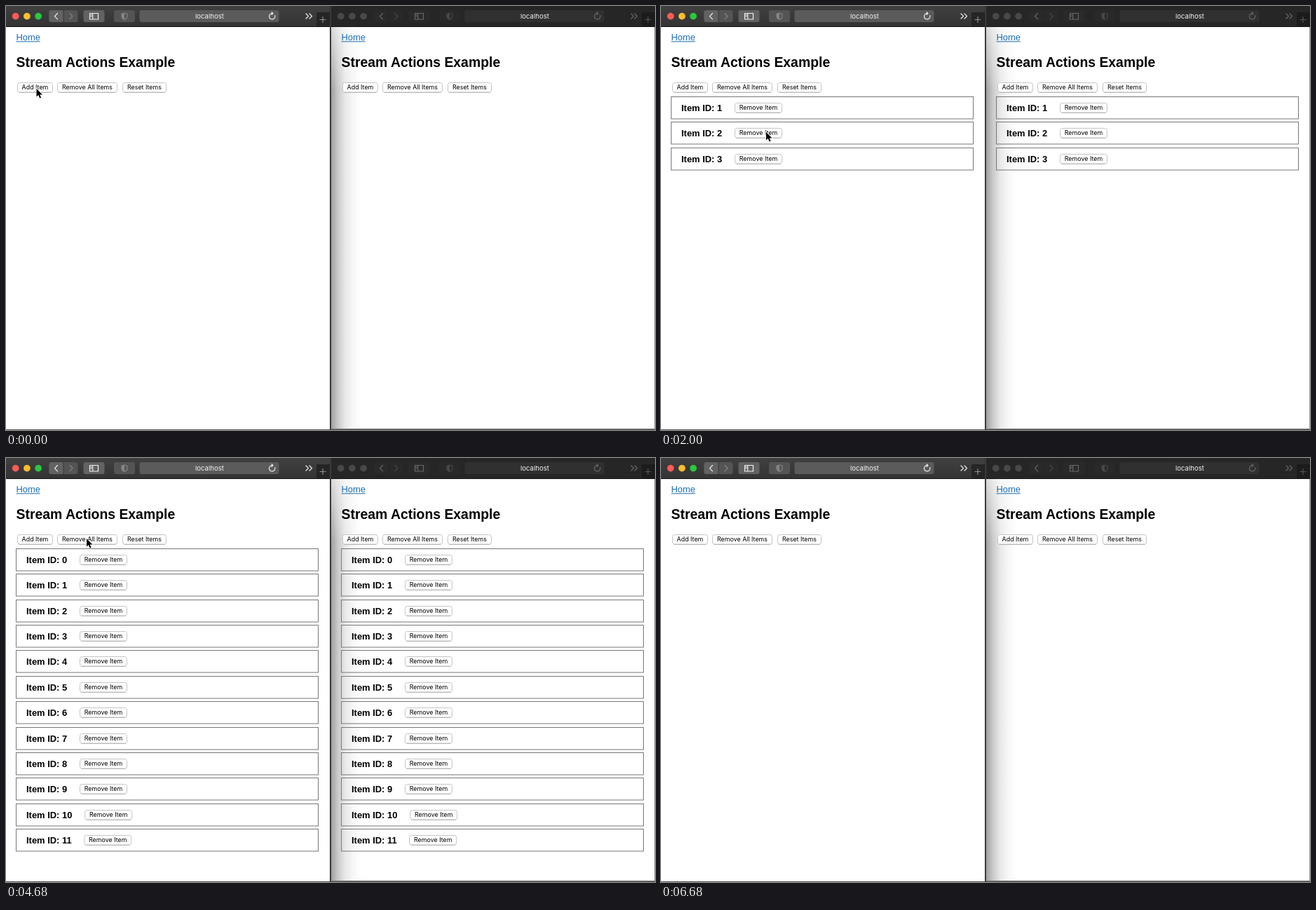
Animation, 926 px wide and 605 px high, one loop 6.74 s. Source, as an HTML page:

```html
<!DOCTYPE html>
<html lang="en">
<head>
<meta charset="utf-8">
<title>Stream Actions</title>
<style>
  html, body { margin: 0; width: 100%; height: 100%; overflow: hidden; background: #fff; }
  svg { display: block; }
  text { font-family: "Liberation Sans", Arial, Helvetica, sans-serif; }
  .link { font-size: 12.93px; fill: #1a6db3; }
  .title { font-size: 19.4px; font-weight: 700; }
  .label { font-size: 12.93px; font-weight: 700; }
  .ui { font-family: Inter, Roboto, sans-serif; font-size: 8.9px; text-anchor: middle; }
  .address { font-size: 9.6px; fill: #f4f4f4; }
  .icon { fill: none; stroke-width: 1.2; stroke-linecap: round; stroke-linejoin: round; }
</style>
</head>
<body>
<svg id="stage" width="926" height="605" viewBox="0 0 926 605">
  <defs>
    <linearGradient id="bar" x2="0" y2="1">
      <stop stop-color="#404040"/><stop offset="1" stop-color="#333"/>
    </linearGradient>
    <linearGradient id="shade">
      <stop stop-opacity=".38"/><stop offset=".2" stop-opacity=".22"/>
      <stop offset=".45" stop-opacity=".09"/><stop offset=".72" stop-opacity=".03"/>
      <stop offset="1" stop-opacity="0"/>
    </linearGradient>
    <linearGradient id="fade" x2="0" y2="1">
      <stop stop-color="#fff" stop-opacity=".6"/><stop offset="1" stop-color="#fff" stop-opacity="0"/>
    </linearGradient>
  </defs>
</svg>
<script>
const LOOP = 6740, ROW = 36.36;

// [time, ids in the list]
const lists = [
  [0, []], [450, [1]], [850, [1, 2]], [1300, [1, 2, 3]], [2250, [1, 3]],
  [3550, [...Array(12).keys()]], [4800, []]
];

// [time, x, y] of the pointer tip
const path = [
  [0, 43.5, 118], [500, 43.5, 118], [1000, 48.5, 118], [1400, 48.5, 118],
  [1900, 150, 180], [2300, 150, 180], [3000, 212, 123], [3150, 212, 123],
  [3500, 206, 116.5], [4000, 206, 116.5], [4500, 115, 115], [5800, 115, 115],
  [6350, 230, -20], [LOOP, 230, -20]
];

const rect = (x, y, w, h, fill, more = '') =>
  `<rect x="${x}" y="${y}" width="${w}" height="${h}" fill="${fill}" ${more}/>`;
const text = (x, y, cls, s) => `<text x="${x}" y="${y}" class="${cls}">${s}</text>`;
const icon = (d, color) => `<path class="icon" d="${d}" stroke="${color}"/>`;

const button = (x, y, w, s) =>
  rect(x + .5, y + .5, w - 1, 13.5, '#fff', 'rx="3" stroke="#c4c4c4"') +
  rect(x + 2.5, y + 14, w - 5, .7, '#a8a8a8') +
  text(x + w / 2, y + 9.9, 'ui', s);

function toolbar(active) {
  const [key, dimKey, field, ink, dim, edge] = active
    ? ['#626262', '#545454', '#5b5b5b', '#f0f0f0', '#858585', '#252525']
    : ['#2a2a2a', '#292929', '#303030', '#686868', '#484848', '#1c1c1c'];
  const lights = active ? ['#fc5b57', '#fdbd2e', '#2ac840'] : Array(3).fill('#484848');
  const box = (x, w, fill) => rect(x, 6, w, 17, fill, 'rx="3"');
  return rect(0, 0, 463, 30, active ? 'url(#bar)' : '#262626') +
    lights.map((c, i) => `<circle cx="${13.7 + 16.2 * i}" cy="14.6" r="4.9" fill="${c}"/>`).join('') +
    box(61.5, 41, dimKey) + box(61.5, 20, key) + rect(81.7, 6, 1, 17, active ? '#3b3b3b' : '#262626') +
    box(110.5, 30, key) + box(154, 30, dimKey) + box(190.5, 199, field) +
    icon('M73.5 10.5l-4 4.2 4 4.2', ink) + icon('M91 10.5l4 4.2-4 4.2', dim) +
    icon('M119.5 10.5h12v8.5h-12zM123.7 10.5v8.5M121 12.7h1M121 14.7h1', ink) +
    icon('M169 10l4 1.3v3.5q0 3-4 4.7q-4-1.7-4-4.7v-3.5z', dim) +
    `<path d="M169 10v9.5q-4-1.7-4-4.7v-3.5z" fill="${dim}"/>` +
    icon('M383.7 13.5a4.2 4.2 0 1 1-3.4-2.9M379 8.8l2 1.8-2 1.8', ink) +
    icon('M428 11l3.5 3.5-3.5 3.5M433 11l3.5 3.5-3.5 3.5', ink) +
    rect(443, 9, 20, 20, edge) + icon('M452 15.5v8M448 19.5h8', active ? '#929292' : '#555') +
    rect(0, 29, 463, 1, '#161616') +
    text(290.4, 18.2, 'ui address', 'localhost');
}

function page(active) {
  return rect(0, 30, 463, 574, '#fff') +
    (active ? '' : rect(0, 30, 44, 574, 'url(#shade)') + rect(0, 30, 44, 90, 'url(#fade)')) +
    text(14.5, 49.2, 'link', 'Home') + rect(14.5, 50.3, 34.2, 1, '#1a6db3') +
    text(14.5, 86.6, 'title', 'Stream Actions Example') +
    button(16, 109, 51, 'Add Item') + button(73, 109, 86, 'Remove All Items') +
    button(166, 109, 63, 'Reset Items') + '<g class="items"></g>';
}

function item(id, i) {
  const shift = id === 11 ? 6.2 : id > 9 ? 7.2 : 0;
  return `<g transform="translate(0 ${Math.round(i * ROW)})">` +
    rect(14.5, 129.5, 431, 31.5, 'none', 'stroke="#777"') +
    text(29, 149.6, 'label', 'Item ID: ' + id) +
    button(105 + shift, 138, 68, 'Remove Item') + '</g>';
}

const stage = document.getElementById('stage');
stage.innerHTML += rect(0, 0, 926, 605, '#555') +
  [true, false].map(active =>
    `<g transform="translate(${active ? 0 : 464} 0)">${toolbar(active)}${page(active)}</g>`).join('') +
  rect(462, 0, 1.5, 605, '#333') + rect(925.3, 30, .7, 574, '#777') +
  rect(463.5, 603, 462.5, 1, '#777') +
  `<path id="pointer" d="M0 0v11.6l2.7-2.5 1.9 4.5 2-.9-1.9-4.3h3.8z"
    stroke="#fff" stroke-width="1.2" paint-order="stroke"/>`;

const groups = stage.querySelectorAll('.items');
const pointer = document.getElementById('pointer');
let shown;

function draw(now) {
  const t = now % LOOP;
  const ids = lists.findLast(s => s[0] <= t)[1];
  if (ids !== shown) {
    shown = ids;
    groups.forEach(g => g.innerHTML = ids.map(item).join(''));
  }
  const k = path.findIndex(p => p[0] > t);
  const [t0, x0, y0] = path[k - 1], [t1, x1, y1] = path[k];
  const u = (t - t0) / (t1 - t0), e = u * u * (3 - 2 * u);
  pointer.setAttribute('transform', `translate(${x0 + (x1 - x0) * e} ${y0 + (y1 - y0) * e})`);
}

const start = performance.now();
function tick() {
  draw(performance.now() - start);
  requestAnimationFrame(tick);
}
tick();
</script>
</body>
</html>
```
